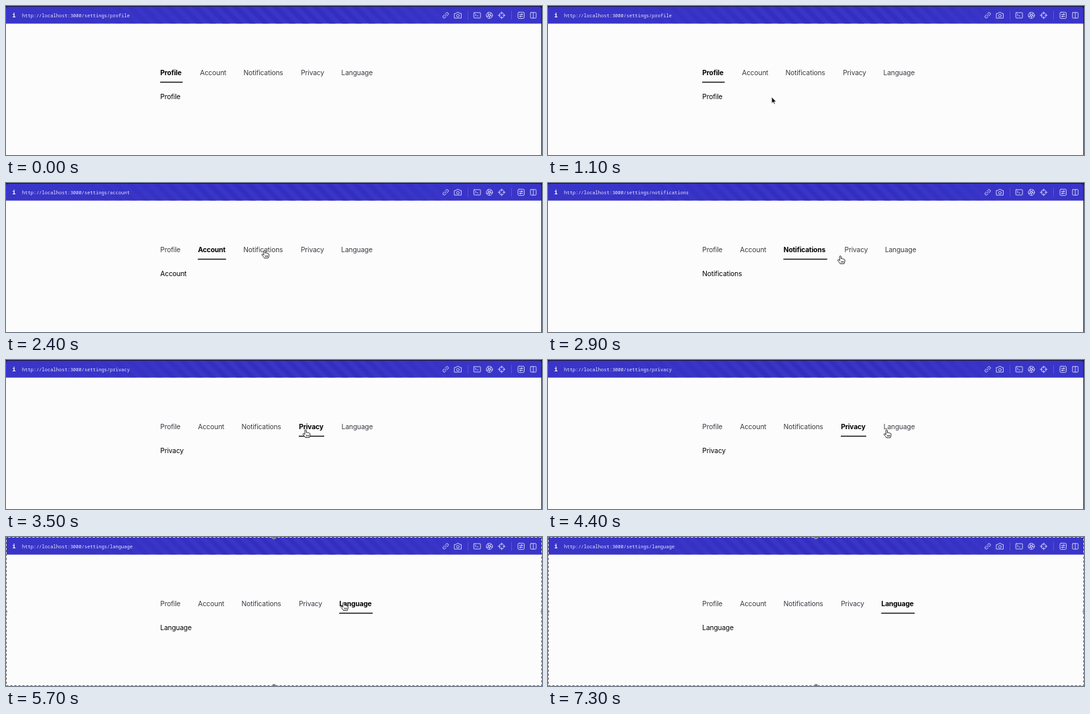
Write an HTML page that moves like this. It is 800 by 224 pixels and loops after 7.7 s.

```html
<!DOCTYPE html>
<html lang="en">
<head>
<meta charset="utf-8">
<title>Settings tabs</title>
<style>
  html, body { margin: 0; width: 100%; height: 100%; overflow: hidden; background: #fcfcfd; }
  svg { display: block; width: 800px; height: 224px; }
  text { white-space: pre; }
  .ui { font: 400 10.2px Inter, sans-serif; letter-spacing: -.13px; fill: #000; }
  .tab { fill: #3b3b42; }
  .tab.on { font-weight: 700; fill: #000; }
  .mono { font: 400 7.05px "Noto Sans Mono", monospace; fill: #e6e5fb; }
  .info { font-size: 9px; font-weight: 700; fill: #fff; }
  .icons { fill: none; stroke: #dddcfa; stroke-width: .9; stroke-linecap: round; stroke-linejoin: round; }
  .cursor { stroke: #111; stroke-width: .9; stroke-linejoin: round; fill: #fff; }
</style>
</head>
<body>
<svg viewBox="0 0 800 224">
  <defs>
    <pattern id="stripes" width="14" height="14" patternUnits="userSpaceOnUse" patternTransform="rotate(-45)">
      <rect width="7" height="14" fill="#2f2ab4"/>
    </pattern>
    <linearGradient id="fade">
      <stop offset=".12" stop-color="#000"/>
      <stop offset=".4" stop-color="#888"/>
      <stop offset=".65" stop-color="#888"/>
      <stop offset=".88" stop-color="#000"/>
    </linearGradient>
    <mask id="middle"><rect width="800" height="27" fill="url(#fade)"/></mask>
  </defs>

  <rect width="800" height="224" fill="#fcfcfd"/>
  <rect width="800" height="8" fill="#15142c"/>
  <path id="bar" d="M0 26.5V4Q0 1 3 1H796Q799 1 799 4V26.5Z" fill="#3935c8"/>
  <rect y="1" width="799" height="25.5" fill="url(#stripes)" mask="url(#middle)"/>
  <path d="M799.5 3V224" stroke="#222"/>

  <text class="mono info" x="12" y="17.2" text-anchor="middle">i</text>
  <text class="mono" id="url" x="24" y="16.5"></text>

  <g class="icons">
    <g transform="translate(656.2 14) rotate(-45)">
      <path d="M-1-2H-3A2 2 0 0 0-3 2H-1M1-2H3A2 2 0 0 1 3 2H1M-2 0H2"/>
    </g>
    <g transform="translate(674.5 14)">
      <path d="M-5-2.8H-2.6L-1.6-4.3H1.6L2.6-2.8H5V4.2H-5Z"/><circle cy=".6" r="2"/>
    </g>
    <path d="M689.5 8V20M754.5 8V20" stroke="#5d59da"/>
    <g transform="translate(703.2 14)">
      <rect x="-5" y="-4" width="10" height="8" rx=".8"/><path d="M-3-1.8L-1.6-.6-3 .6M-.4 .8H1.2"/>
    </g>
    <g transform="translate(721.5 14)">
      <circle r="4.6"/><circle r="1.6"/>
      <path d="M0-1.6L3.2-3.2M1.5-.5L4.1 2M.9 1.3L-.6 4.5M-.9 1.3L-4.2 1.6M-1.5-.5L-2-4.1"/>
    </g>
    <g transform="translate(739.8 14)">
      <circle r="3.7"/><path d="M0-5.2V-1.9M0 5.2V1.9M-5.2 0H-1.9M5.2 0H1.9"/>
    </g>
    <g transform="translate(768.8 14)">
      <rect x="-4.7" y="-4.7" width="9.4" height="9.4" rx="1.8"/>
      <path d="M-2.5-1.5H2.5M-2.5 1.5H2.5M1-2.7V-.3M-1 .3V2.7"/>
    </g>
    <g transform="translate(787 14)">
      <rect x="-4.2" y="-4.2" width="8.4" height="8.4" rx=".8"/><path d="M0-4.2V4.2"/>
    </g>
  </g>

  <g id="tabs"></g>
  <rect id="line" y="113.8" height="1.5" fill="#111"/>
  <text class="ui" id="content" x="230.3" y="139.8"></text>

  <path class="cursor" id="hand" d="M-1.2 1.2C-1.2-.3 1-.3 1 1.2V4.4C1.3 3.7 2.9 3.8 3 4.8 3.5 4.1 4.9 4.4 5 5.4 5.7 4.9 6.5 5.4 6.5 6.3V8.4C6.5 9.8 5.6 10.4 5.5 11.8H-.6C-.8 10.5-3.3 8.4-4 7-4.4 6-3.3 5.4-2.5 6.1L-1.2 7.3ZM1.2 8V10M2.8 8V10M4.4 8V10"/>
  <path class="cursor" id="arrow" d="M0 0V10L2.3 8 3.8 11.5 5.4 10.8 3.9 7.4H7Z" style="fill:#111;stroke:#fff"/>

  <g id="selection">
    <rect x=".5" y=".5" width="799" height="223" fill="none" stroke="#e8e8ec"/>
    <rect x=".5" y=".5" width="799" height="223" fill="none" stroke="#555" stroke-dasharray="3 3"/>
    <g fill="#777" stroke="#ccc" stroke-width=".6">
      <circle cx="400" r="3"/><circle cx="400" cy="224" r="3"/>
      <circle cy="112" r="2"/><circle cx="800" cy="112" r="2"/>
    </g>
  </g>
</svg>
<script>
const LOOP = 7700, STEP = 100, LEFT = 230.3, GAP = 26;
const $ = id => document.getElementById(id);

// name, regular width, bold width, time of the click
const tabs = [
  ['Profile', 30.2, 33.2, 0],
  ['Account', 39, 41.7, 1400],
  ['Notifications', 59.7, 65, 2500],
  ['Privacy', 34.4, 37.6, 3400],
  ['Language', 46.6, 49.5, 4900]
];

// pointer tip: time, x, y
const path = [
  [600, 405, 213], [700, 374, 191.5], [800, 374, 191.5], [1300, 307, 100],
  [1600, 309, 101], [1800, 344, 102.5], [2200, 385, 101], [2600, 387, 101],
  [2900, 436.5, 109.5], [3100, 447, 105], [3900, 447.5, 104.5],
  [4400, 505.5, 105], [4500, 505.5, 105], [4900, 504, 98.5], [5900, 504, 98.5]
];

const labels = tabs.map(([name]) => {
  const label = document.createElementNS('http://www.w3.org/2000/svg', 'text');
  label.textContent = name;
  return $('tabs').appendChild(label);
});

const show = (id, on) => $(id).setAttribute('visibility', on ? 'visible' : 'hidden');

function pointerAt(t) {
  const i = path.findIndex(p => p[0] > t);
  if (i < 1) return null;
  const [t0, x0, y0] = path[i - 1], [t1, x1, y1] = path[i];
  const k = (t - t0) / (t1 - t0);
  return [x0 + (x1 - x0) * k, y0 + (y1 - y0) * k];
}

function drawTabs(t) {
  const active = tabs.filter(tab => tab[3] <= t).length - 1;
  let x = LEFT;
  tabs.forEach(([name, regular, bold], i) => {
    const on = i === active, width = on ? bold : regular;
    labels[i].setAttribute('class', on ? 'ui tab on' : 'ui tab');
    labels[i].setAttribute('x', x);
    labels[i].setAttribute('y', on ? 103.5 : 104);
    if (on) {
      $('line').setAttribute('x', x - .2);
      $('line').setAttribute('width', width + .4);
      $('content').textContent = name;
      $('url').textContent = 'http://localhost:3000/settings/' + name.toLowerCase();
    }
    x += width + GAP;
  });
}

function drawPointer(t) {
  const tip = pointerAt(t), overTabs = tip && tip[1] < 125;
  show('hand', tip && overTabs);
  show('arrow', tip && !overTabs);
  if (tip) $(overTabs ? 'hand' : 'arrow').setAttribute('transform', `translate(${tip})`);
}

const start = performance.now();
function frame() {
  const t = Math.floor((performance.now() - start) % LOOP / STEP) * STEP;
  drawTabs(t);
  drawPointer(t);
  show('selection', t >= 5500);
  requestAnimationFrame(frame);
}
frame();
</script>
</body>
</html>
```
